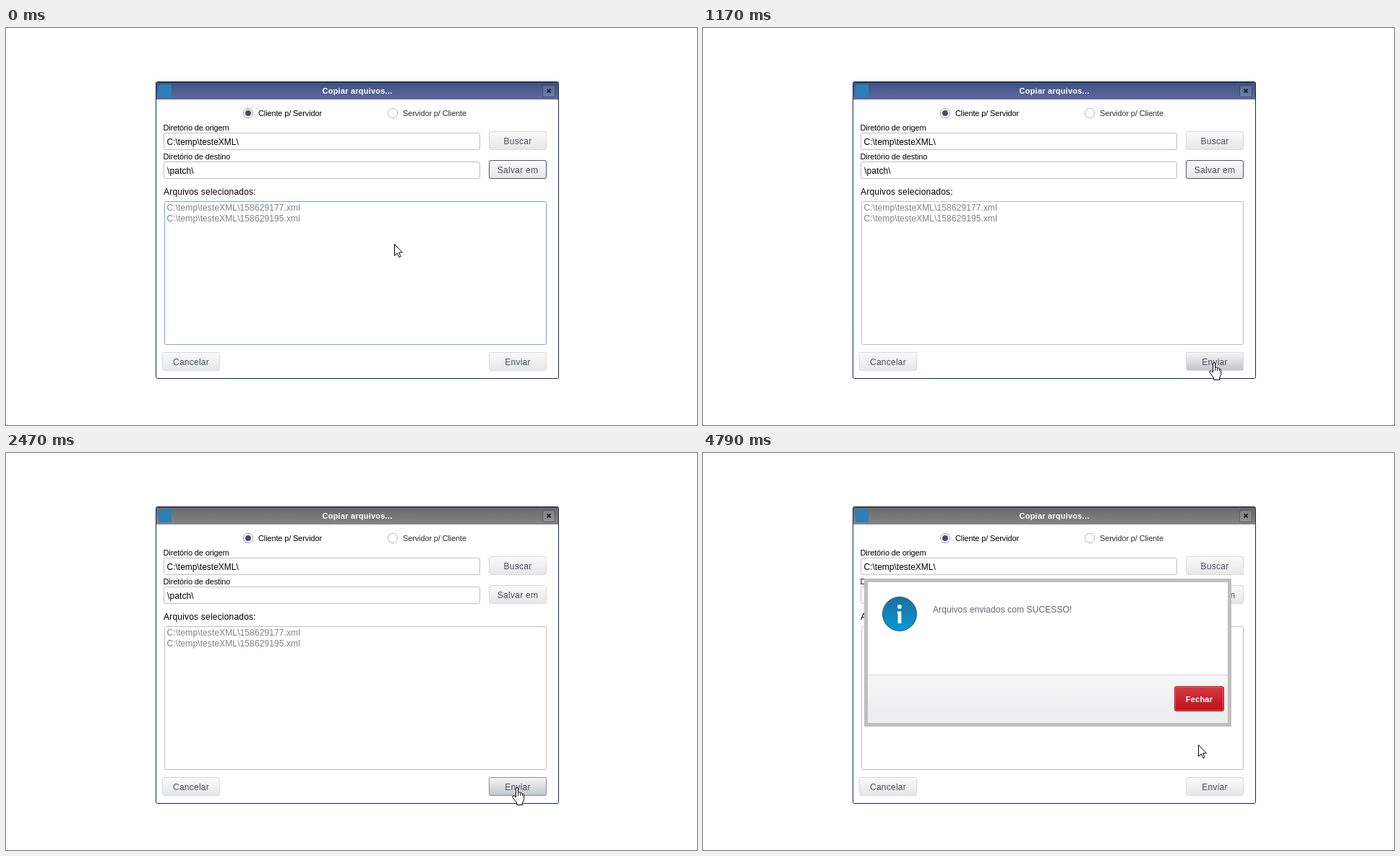
Recreate the animation shown at these times as an HTML page. Size 956 px wide and 550 px high, loop 4.9 s.

```html
<!DOCTYPE html>
<html lang="pt-BR">
<head>
<meta charset="utf-8">
<title>Copiar arquivos</title>
<style>
  html, body { margin: 0; width: 100%; height: 100%; overflow: hidden; background: #fff; }
  svg { display: block; }
  text { font: 12px "Liberation Sans", Arial, sans-serif; letter-spacing: .1px; white-space: pre; }
  .small { font-size: 11px; letter-spacing: -.13px; }
  .bold { font-size: 11px; font-weight: bold; letter-spacing: .22px; fill: #fff; text-anchor: middle; }
  .btn { fill: #4b4f5d; letter-spacing: .25px; text-anchor: middle; }
  .gray { fill: #808080; }
  .field { fill: #fff; stroke: #c0c0c0; }
  .ring { fill: none; stroke: #53556f; }
  .cursor { fill: #fff; stroke: #000; stroke-linejoin: round; }
</style>
</head>
<body>
<svg id="stage" width="956" height="550" viewBox="0 0 956 550">
  <defs id="defs"></defs>

  <rect x="207.5" y="74.5" width="557" height="411" rx="2" fill="#fff" stroke="#0c2f4d"/>
  <rect x="208" y="75" width="556" height="24" fill="url(#active)"/>
  <g id="inactive">
    <rect x="208" y="75" width="556" height="24" fill="url(#idle)"/>
  </g>
  <path d="M208 75.5H764" stroke="#000" stroke-opacity=".25"/>
  <rect x="211" y="78" width="18" height="18" rx="2" fill="#2a80b8"/>
  <text class="bold" x="486" y="91">Copiar arquivos...</text>
  <rect x="742.5" y="79.5" width="17" height="16" rx="2" fill="#fff" fill-opacity=".14" stroke="#000" stroke-opacity=".3"/>
  <path d="M748.5 84.5l5 5m0-5l-5 5" stroke="#1c2340" stroke-width="1.8"/>

  <circle cx="335" cy="118" r="6.6" fill="#fff" stroke="#999ba3"/>
  <circle cx="335" cy="118" r="4" fill="#484d66"/>
  <circle cx="535" cy="118" r="6.6" fill="#fff" stroke="#b8b8b8"/>
  <text class="small" x="349" y="122">Cliente p/ Servidor</text>
  <text class="small" x="549" y="122" fill="#303030">Servidor p/ Cliente</text>

  <text class="small" x="217.5" y="142">Diretório de origem</text>
  <rect class="field" x="218.5" y="145.5" width="437" height="23" rx="2.5"/>
  <text x="222.5" y="162" style="letter-spacing:0">C:\temp\testeXML\</text>
  <text class="small" x="217.5" y="182">Diretório de destino</text>
  <rect class="field" x="218.5" y="185.5" width="437" height="23" rx="2.5"/>
  <text x="223" y="202">\patch\</text>

  <text x="218" y="231" style="letter-spacing:.2px">Arquivos selecionados:</text>
  <rect class="field" id="list" x="219.5" y="240.5" width="528" height="198" rx="2"/>
  <text class="gray" x="222.5" y="253">C:\temp\testeXML\158629177.xml</text>
  <text class="gray" x="222.5" y="268">C:\temp\testeXML\158629195.xml</text>

  <g id="buttons"></g>

  <g id="dialog">
    <rect x="223" y="174" width="508" height="205" fill="#bfbfbf"/>
    <rect x="228" y="179" width="498" height="195" fill="#fff"/>
    <rect x="228" y="307" width="498" height="67" fill="url(#footer)"/>
    <path d="M228 307.5H726" stroke="#d3d7d9"/>
    <circle cx="272" cy="223" r="23.5" fill="url(#info)" stroke="#145a7d"/>
    <circle cx="272" cy="213" r="2.9" fill="#fff"/>
    <path d="M268.8 219.5H274.4V236H269.6V222.5H268.8Z" fill="#fff"/>
    <text x="318" y="221" fill="#62646b">Arquivos enviados com SUCESSO!</text>
    <rect x="652.5" y="323.5" width="68" height="34" rx="2.5" fill="url(#red)" stroke="#b5161d"/>
    <rect x="653.5" y="324.5" width="66" height="32" rx="2" fill="none" stroke="#f08288" stroke-opacity=".6"/>
    <text class="bold" x="686.5" y="345">Fechar</text>
  </g>

  <path class="cursor" id="arrow" d="M.5 .5V16.4L4.2 12.9L6.9 18.6L9.1 17.6L6.6 12H11.5Z"/>
  <g class="cursor" id="hand" transform="translate(700 463)">
    <path d="M5.5 14V2.2Q5.5 .6 7 .6T8.5 2.2V7.6Q9 6.8 10.2 7T11.5 8.4Q12.2 7.7 13.3 8T14.5 9.4Q16.6 9 16.6 11.2V16.5Q16.4 18.8 14.7 21V24.5H6.8V21.8L1.2 14.6Q.2 12.8 1.6 12T4.2 12.8Z"/>
    <path d="M8.5 7.5V12M11.5 8.5V12M14.5 9.5V12.5" stroke-width=".9"/>
  </g>
</svg>
<script>
const LOOP = 4900;
const $ = id => document.getElementById(id);

const gradients = {
  active: ["#40507f", "#5b6ca1"],
  idle: ["#686868", "#868686"],
  plain: ["#fafafa", "#e5e6e7"],
  hover: ["#f5f6f6", "#c2c6c8"],
  footer: ["#f5f6f6", "#ebeced"],
  info: ["#1b719c", "#0897d9"],
  red: ["#d43a43", "#bb1119"]
};
$("defs").innerHTML = Object.entries(gradients).map(([id, [top, bottom]]) =>
  `<linearGradient id="${id}" x2="0" y2="1"><stop stop-color="${top}"/>` +
  `<stop offset="1" stop-color="${bottom}"/></linearGradient>`).join("");

const button = (id, label, x, y) => {
  const box = `x="${x + .5}" y="${y + .5}" width="79" height="25" rx="2.5"`;
  return `<rect id="${id}" ${box} fill="url(#plain)" stroke="#d8dadb"/>` +
    `<rect id="${id}Ring" class="ring" ${box} opacity="0"/>` +
    `<text class="btn" x="${x + 40}" y="${y + 18}">${label}</text>`;
};
$("buttons").innerHTML =
  button("browse", "Buscar", 668, 143) + button("save", "Salvar em", 668, 183) +
  button("cancel", "Cancelar", 216, 449) + button("send", "Enviar", 668, 449);

// Each row: start time, then the values held until the next row.
const pointer = [
  [0, 537, 299], [90, 534, 294], [180, 529, 285], [270, 524, 276],
  [350, 519, 267], [440, 516, 261], [570, 560, 311], [640, 598, 352],
  [710, 633, 390], [790, 661, 421], [860, 683, 444], [930, 697, 459],
  [1010, 705, 466], [4730, 698, 440], [4790, 685, 404]
];
const listFocus = [[0, 1], [860, 0]];
const hovered = [[0, 0], [1170, 1], [4730, 0]];
const saveRing = [[0, 1], [2010, .7], [2090, .4], [2180, .15], [2260, 0]];
const sendRing = [[0, 0], [2010, .3], [2090, .6], [2180, .85], [2260, 1], [2470, .6], [2610, .3], [2680, 0]];
const titleIdle = [[0, 0], [2470, 1], [2610, .5], [2680, 0], [4260, 1]];
const dialogOpen = [[0, 0], [4260, 1]];

const at = (steps, t) => steps.findLast(row => row[0] <= t).slice(1);
const fade = (id, value) => $(id).setAttribute("opacity", value);

function draw(t) {
  const [x, y] = at(pointer, t);
  const [over] = at(hovered, t);
  $("arrow").setAttribute("transform", `translate(${x} ${y})`);
  fade("arrow", 1 - over);
  fade("hand", over);
  $("send").setAttribute("fill", over ? "url(#hover)" : "url(#plain)");
  $("list").style.stroke = at(listFocus, t)[0] ? "#6ea5ec" : "#c0c0c0";
  fade("saveRing", at(saveRing, t));
  fade("sendRing", at(sendRing, t));
  fade("inactive", at(titleIdle, t));
  fade("dialog", at(dialogOpen, t));
}

const start = performance.now();
function tick() {
  draw((performance.now() - start) % LOOP);
  requestAnimationFrame(tick);
}
tick();
</script>
</body>
</html>
```
